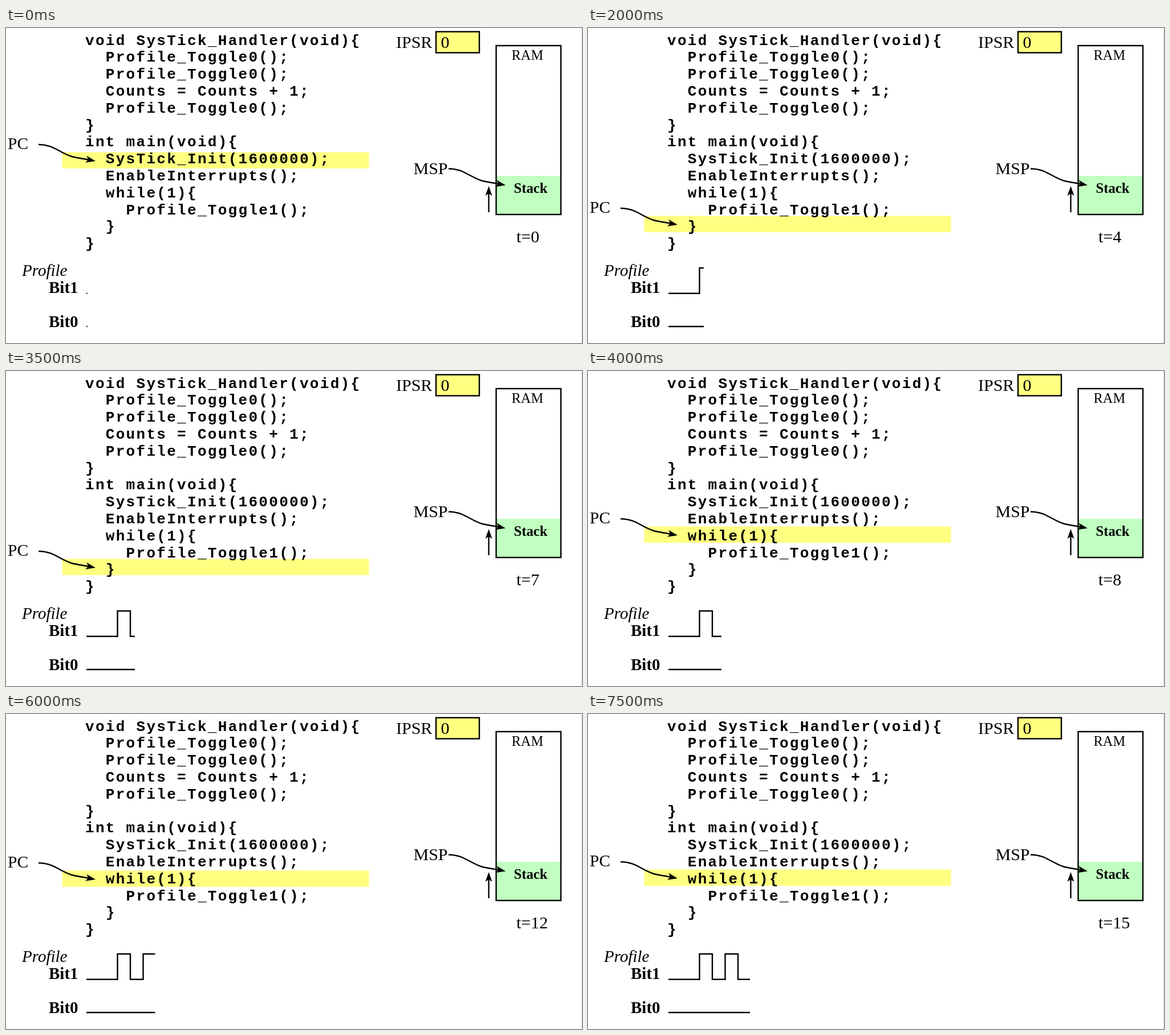
Recreate the animation shown at these times as an HTML page. Size 1010 px wide and 554 px high, loop 8000 ms.

```html
<!DOCTYPE html>
<html lang="en">
<head>
<meta charset="utf-8">
<title>SysTick profile</title>
<style>
  html, body { margin: 0; width: 100%; height: 100%; overflow: hidden; background: #fff; }
  svg { display: block; width: 100%; height: 100%; }
  text { font: 30px "Liberation Serif", "Times New Roman", serif; white-space: pre; }
  .code text { font: bold 26px "Liberation Mono", "Courier New", monospace; letter-spacing: 2.3px; }
  .bit { font-size: 29px; font-weight: bold; }
  .line { fill: none; stroke: #000; stroke-width: 2.4; }
</style>
</head>
<body>
<svg viewBox="0 0 1010 554">
  <defs>
    <path id="head" d="M0 0L-17 -6L-13 0L-17 6Z"/>
    <g id="pointer">
      <path class="line" d="M0 0C26 0 36 14 58 21C66 23.5 78 24.5 90 27"/>
      <use href="#head" transform="translate(100 29) rotate(11)"/>
    </g>
  </defs>

  <rect x="1009" width="1" height="554" fill="#ddd"/>

  <g id="pc">
    <rect x="98.5" y="218.5" width="538" height="28.5" fill="#ffff80"/>
    <text x="3" y="213" style="font-size:29.5px">PC</text>
    <use href="#pointer" x="57" y="205"/>
  </g>
  <g class="code" id="code"></g>

  <text x="684" y="35">IPSR</text>
  <rect class="line" x="754" y="6.5" width="76" height="37" style="fill:#ffff80"/>
  <text x="762.5" y="35">0</text>

  <rect x="860" y="260" width="113" height="68" fill="#c0ffc0"/>
  <rect class="line" x="859.5" y="31" width="113.5" height="297"/>
  <text x="886.5" y="56" style="font-size:24.4px">RAM</text>
  <text x="890.5" y="290" style="font-size:24.7px;font-weight:bold">Stack</text>
  <text x="714.5" y="257">MSP</text>
  <use href="#pointer" x="776" y="247.5"/>
  <path class="line" d="M846.5 324V290"/>
  <use href="#head" transform="translate(846.5 278) rotate(-90)"/>
  <text id="clock" x="895" y="377"></text>

  <text x="28" y="436" style="font-size:29px;font-style:italic">Profile</text>
  <text class="bit" x="75" y="466">Bit1</text>
  <text class="bit" x="75" y="525.5">Bit0</text>
  <path id="bit1" class="line"/>
  <path id="bit0" class="line"/>
</svg>
<script>
const $ = id => document.getElementById(id);

const source = `void SysTick_Handler(void){
  Profile_Toggle0();
  Profile_Toggle0();
  Counts = Counts + 1;
  Profile_Toggle0();
}
int main(void){
  SysTick_Init(1600000);
  EnableInterrupts();
  while(1){
    Profile_Toggle1();
  }
}`;

source.split('\n').forEach((line, i) => {
  const text = document.createElementNS('http://www.w3.org/2000/svg', 'text');
  const indent = line.search(/\S/);
  text.setAttribute('x', 139 + indent * 17.9);
  text.setAttribute('y', 29.5 + i * 29.8);
  text.textContent = line.trim();
  $('code').append(text);
});

const STEP = 500, STEPS = 16;
const START = 141, LOW = 466.8, HIGH = 422, ZERO = 525;
const edges = [195.5, 218, 240.5, 263];

// Program counter offset and trace end for each step
const setup = [0, 23, 55];
const cycle = [82, 112, 57, 85, 112, 55, 55];
const ends = [142.5, 164, 187, 203, 203, 211, 219, 226, 234, 240, 246, 254, 261.5, 269, 276, 284];

const pcOffset = n => n < 3 ? setup[n] : cycle[(n - 3) % 7];

function trace(end) {
  let y = LOW, d = `M${START} ${y}`;
  for (const x of edges) {
    if (x > end) break;
    y = LOW + HIGH - y;
    d += `H${x}V${y}`;
  }
  return d + `H${end}`;
}

let shown = -1;
function draw(ms) {
  const n = Math.floor(ms / STEP) % STEPS;
  if (n === shown) return;
  shown = n;
  $('pc').setAttribute('transform', `translate(0 ${pcOffset(n)})`);
  $('clock').textContent = `t=${n}`;
  $('bit1').setAttribute('d', trace(ends[n]));
  $('bit0').setAttribute('d', `M${START} ${ZERO}H${ends[n]}`);
}

const begin = performance.now();
function tick() {
  draw(performance.now() - begin);
  requestAnimationFrame(tick);
}
tick();
</script>
</body>
</html>
```
